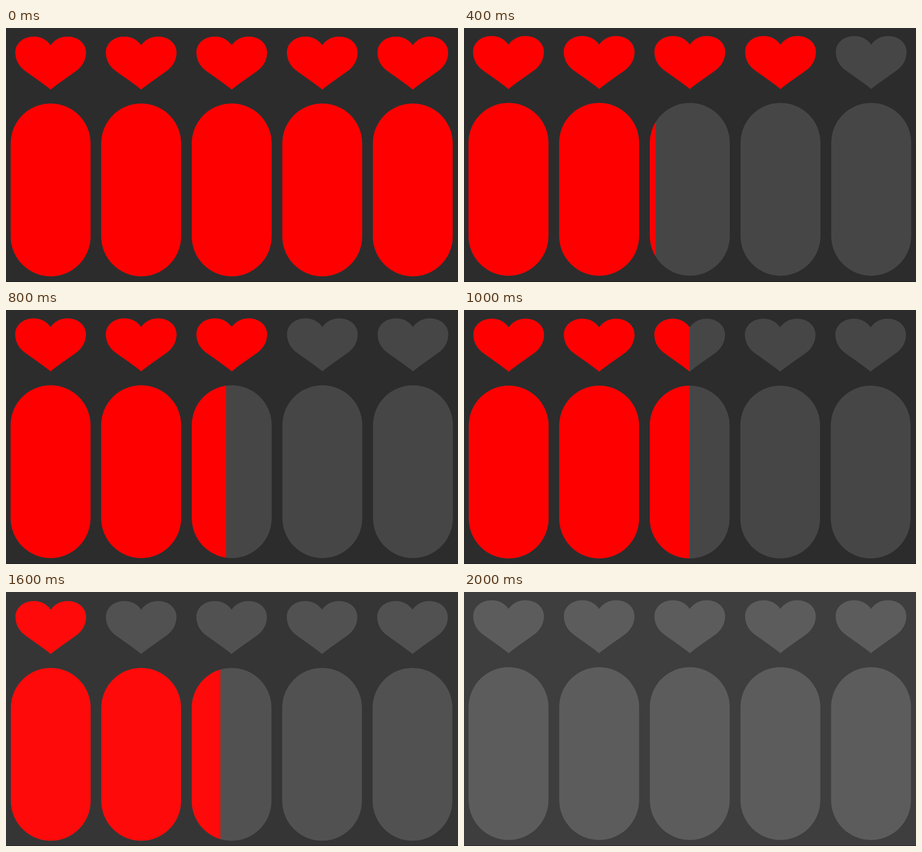
Animation, 998 px wide and 561 px high, one loop 2200 ms. Source, as an HTML page:

```html
<!DOCTYPE html>
<html lang="en">
<head>
<meta charset="utf-8">
<title>Hearts and stamina</title>
<style>
  html, body { margin: 0; width: 100%; height: 100%; overflow: hidden; background: #2c2c2c; }
  svg { display: block; width: 998px; height: 561px; }
  .empty { fill: var(--empty); }
  .full { fill: var(--full); }
</style>
</head>
<body>
<svg id="stage" viewBox="0 0 998 561">
  <defs>
    <path id="heart" d="M88.5 38C80 26 67 19 51 19C28 19 10.5 34 10.5 54C10.5 69 17 82 28.5 92C42 102.5 72 122 88.5 136C105 122 135 102.5 148.5 92C160 82 166.5 69 166.5 54C166.5 34 149 19 126 19C110 19 97 26 88.5 38Z"/>
    <rect id="pill" x="0.3" y="166.7" width="176.3" height="381.7" rx="88.15"/>
  </defs>
  <rect id="back" width="998" height="561"/>
  <g id="hud"></g>
  <rect y="560" width="998" height="1" fill="#1c1c1c"/>
</svg>
<script>
const STEP = 200, STEPS = 11, COUNT = 5, PITCH = 200, PILL_WIDTH = 176.6;
const stage = document.getElementById('stage');
const back = document.getElementById('back');
const hud = document.getElementById('hud');

// key points: [step, value]
const heartKeys = [[0, 5], [1, 4.25], [3, 3.5], [10, 0]];
const staminaKeys = [[0, 5], [1, 1.79], [3, 2.36], [5, 2.5], [7, 2.36], [9, 2.36], [10, 0]];

function sample(keys, step) {
  const next = Math.max(1, keys.findIndex(([at]) => at >= step));
  const [[from, a], [to, b]] = [keys[next - 1], keys[next]];
  return a + (b - a) * (step - from) / (to - from);
}

const hearts = step => Math.ceil(sample(heartKeys, step) * 4) / 4;
const sway = step => -1.3 * Math.sin(2 * Math.PI * step / 9.2);

// The screen blinks lighter as the last heart empties.
const flash = step => step > 7 && step % 2 === 0 ? (step - 6) / 4 : 0;

function add(parent, tag, attrs = {}) {
  const node = document.createElementNS('http://www.w3.org/2000/svg', tag);
  for (const key in attrs) node.setAttribute(key, attrs[key]);
  return parent.appendChild(node);
}

function addMeter(slot, shape, i) {
  const id = shape + 'Clip' + i;
  const clip = add(add(slot, 'clipPath', { id }), 'path');
  add(slot, 'use', { href: '#' + shape, class: 'empty' });
  add(slot, 'use', { href: '#' + shape, class: 'full', 'clip-path': `url(#${id})` });
  return clip;
}

const slots = Array.from({ length: COUNT }, (_, i) => {
  const slot = add(hud, 'g', { transform: `translate(${i * PITCH} 0)` });
  return { heart: addMeter(slot, 'heart', i), pill: addMeter(slot, 'pill', i) };
});

const bar = width => `M-1 0H${width}V561H-1Z`;

// Hearts fill counter-clockwise from the top.
function wedge(part) {
  if (part <= 0) return '';
  if (part >= 1) return bar(PITCH);
  const r = 200, angle = part * 2 * Math.PI;
  const x = 88.5 - r * Math.sin(angle), y = 76 - r * Math.cos(angle);
  return `M88.5 76V${76 - r}A${r} ${r} 0 ${+(part > 0.5)} 0 ${x} ${y}Z`;
}

function pillBar(part) {
  if (part <= 0) return '';
  return bar(part >= 1 ? PITCH : part * PILL_WIDTH);
}

const grey = v => `rgb(${v},${v},${v})`;

function draw(step) {
  const light = flash(step), y = sway(step);
  const x = 10.15 + 0.4 * y, pitch = 199.9 - 0.25 * y;
  back.setAttribute('fill', grey(44 + 18 * light));
  stage.style.setProperty('--empty', grey(70 + 22 * light));
  stage.style.setProperty('--full', `rgb(255,${20 * light},${20 * light})`);
  hud.setAttribute('transform', `translate(${x} ${y}) scale(${pitch / PITCH} 1)`);
  slots.forEach((slot, i) => {
    slot.heart.setAttribute('d', wedge(hearts(step) - i));
    slot.pill.setAttribute('d', pillBar(sample(staminaKeys, step) - i));
  });
}

const start = performance.now();
let shown = 0;
function tick() {
  const elapsed = Math.max(0, performance.now() - start);
  const step = Math.floor(elapsed / STEP) % STEPS;
  if (step !== shown) draw(shown = step);
  requestAnimationFrame(tick);
}
draw(0);
requestAnimationFrame(tick);
</script>
</body>
</html>
```
